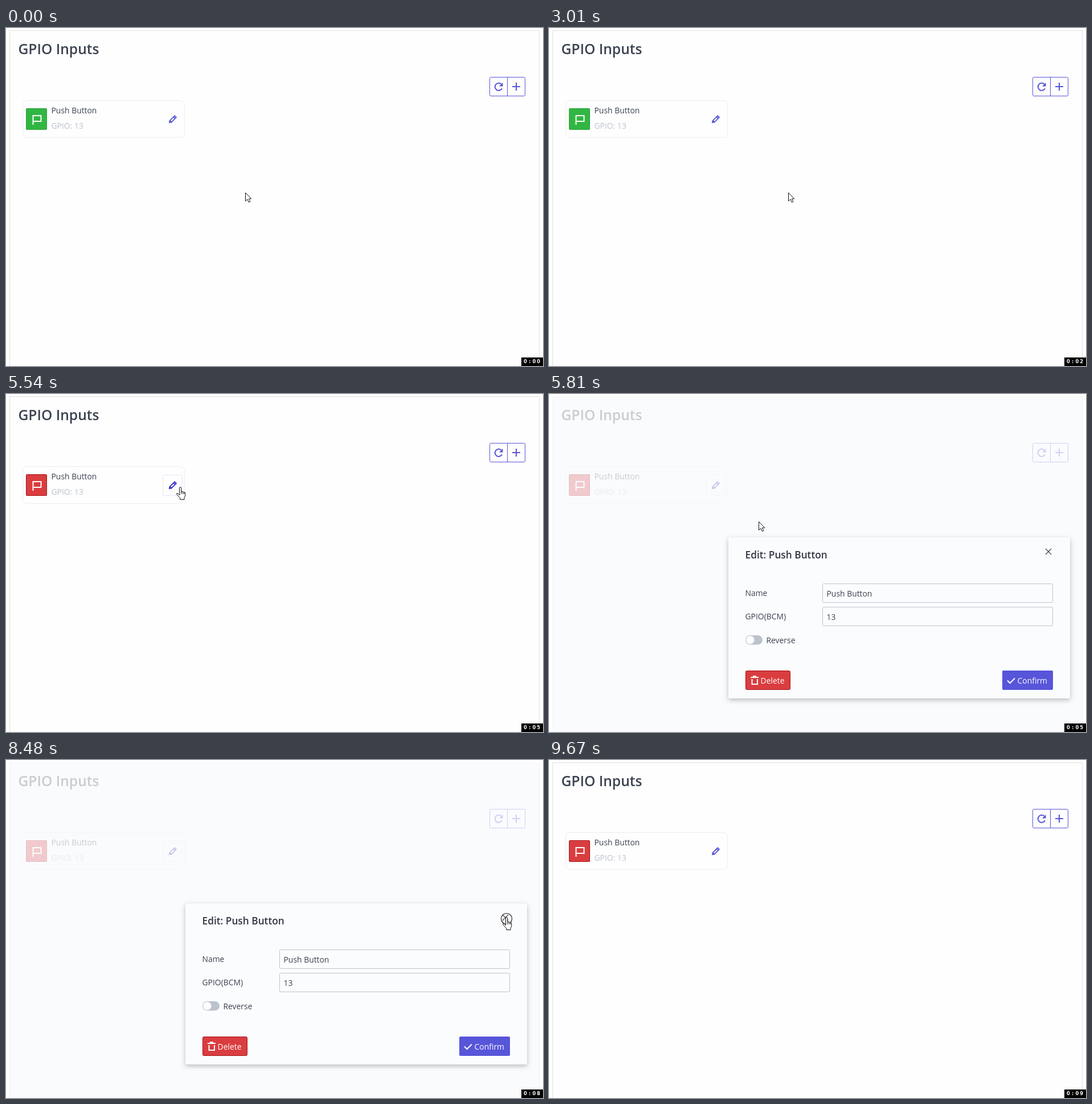
An HTML page for the animation above (9.77 s loop, 943 by 594 pixels).

```html
<!DOCTYPE html>
<html lang="en">
<head>
<meta charset="utf-8">
<title>GPIO Inputs</title>
<style>
  html, body { margin: 0; width: 100%; height: 100%; overflow: hidden; background: #fff; }
  svg { display: block; width: 943px; height: 594px; }
  text { font: 13.9px "Open Sans", "Noto Sans", sans-serif; fill: #3b4351; }
  text.title { font-size: 24.6px; font-weight: 600; }
  text.heading { font-size: 17.3px; font-weight: 600; fill: #303742; }
  text.muted { fill: #bcc3ce; }
  text.light { fill: #fff; }
  text.clock { font: bold 8.4px "DejaVu Sans", sans-serif; fill: #fff; text-anchor: middle; }
  .line { fill: none; stroke: currentColor; stroke-width: 2; }
  .primary { color: #5755d9; }
  .white { color: #fff; }
  .field { fill: #fbfcfe; stroke: #bcc3ce; }
  .danger { fill: #da3d3f; stroke: #a51518; }
  #modal > .box { fill: #fbfcfe; filter: drop-shadow(0 3px 4px rgba(48, 55, 66, .32)); }
  .cursor { fill: #fff; stroke: #111; stroke-width: 1; stroke-linejoin: round; }
</style>
</head>
<body>
<svg viewBox="0 0 943 594">
  <rect x="6.5" y="4.5" width="930" height="600" fill="#fefefe" stroke="#dfe0e2"/>
  <text class="title" x="21.5" y="46">GPIO Inputs</text>

  <!-- toolbar -->
  <g class="primary">
    <path class="line" style="stroke-width:1" d="M851.5 86.5h58a2 2 0 0 1 2 2v29a2 2 0 0 1-2 2h-58a2 2 0 0 1-2-2v-29a2 2 0 0 1 2-2zM880.5 86.5v33"/>
    <path class="line" d="M871 106.2A6.5 6.5 0 1 1 869.6 98.5"/>
    <path fill="currentColor" d="M872.5 96v6.5h-6.5z"/>
    <path class="line" d="M889 103h14M896 96v14"/>
  </g>

  <!-- input card -->
  <rect x="29.5" y="127.5" width="284" height="65" rx="8" fill="none" stroke="#ebecef"/>
  <rect id="badge" x="35.5" y="141.5" width="36" height="37" rx="1.5"/>
  <path class="line white" d="M47.5 170v-16h14v10h-14"/>
  <text x="79.5" y="150">Push Button</text>
  <text class="muted" x="79.5" y="177">GPIO: 13</text>
  <rect id="editHover" x="275.5" y="142.5" width="34" height="36" rx="2" fill="#fefefe" stroke="#e6e6f6"/>
  <g id="pencil">
    <path class="line" style="stroke-width:1.8" d="M287.8 162.6l8.3-8.3 2.8 2.8-8.3 8.3zM294.2 156.2l2.8 2.8"/>
    <path fill="currentColor" d="M285.8 167.2l1-5.2 4.2 4.2z"/>
  </g>

  <!-- edit dialog -->
  <g id="modal">
    <rect x="6" y="4" width="932" height="590" fill="#f8fafd" opacity=".75"/>
    <rect class="box" x="315" y="252" width="600" height="283" rx="2"/>
    <text class="heading" x="344.5" y="288.5">Edit: Push Button</text>
    <path class="line" style="stroke-width:1.2" color="#444" d="M872 272l10 10m0-10l-10 10"/>
    <text x="344.5" y="355">Name</text>
    <rect class="field" x="480.5" y="333.5" width="404" height="33" rx="2"/>
    <text x="487.5" y="356">Push Button</text>
    <text x="344.5" y="396">GPIO(BCM)</text>
    <rect class="field" x="480.5" y="374.5" width="404" height="33" rx="2"/>
    <text x="487.5" y="397">13</text>
    <rect x="345" y="424" width="30" height="16.5" rx="8.2" fill="#bcc3ce"/>
    <circle cx="353.3" cy="432.2" r="7.2" fill="#fff"/>
    <text x="381.5" y="437.5">Reverse</text>
    <rect class="danger" x="345.5" y="486.5" width="78" height="33" rx="2"/>
    <path class="line white" d="M354 498h14M358 496h6M356.5 501v9h9.5v-9"/>
    <text class="light" x="371.5" y="508.5">Delete</text>
    <rect x="796" y="486" width="89" height="34" rx="2" fill="#5755d9"/>
    <path class="line white" d="M805 503.5l4.5 4.5 8.5-8.5"/>
    <text class="light" x="822.5" y="508.5">Confirm</text>
  </g>
  <circle id="press" cx="879" cy="279" r="9.5" fill="none" stroke="#222" stroke-width="1.2"/>

  <path id="arrow" class="cursor" d="M.5.5v14.7l3.4-3.2 2.4 5.3 2.5-1.1-2.4-5.1h4.4z"/>
  <path id="hand" class="cursor" d="M5.5 14.5V2.2a1.6 1.6 0 0 1 3.2 0v6.3q1.5-1.2 2.6.5 1.6-1 2.4.6 1.9-.6 2 1.4v5.2l-1.7 3.3v3H6.8v-2.6L1 13.6q-1.2-2.2 1-2.4zM8.7 8.5v4.3M11.3 9v3.8M13.7 9.8v3"/>

  <rect x="905" y="579" width="38" height="15"/>
  <text id="clock" class="clock" x="912 919.8 927.3 935.1" y="589.1"></text>
</svg>
<script>
const LOOP = 9770;
const GREEN = ["#32b643", "#2da23c"];
const RED = ["#da3d3f", "#a51518"];
const TURNING = ["#a8613f", "#803f23"];

// Every track lists [start time, value] and holds its value until the next entry.
const badgeTrack = [[0, GREEN], [830, RED], [3010, GREEN], [4920, TURNING], [5270, RED]];
const clockTrack = [0, 930, 1930, 3110, 4170, 5020, 6160, 7360, 8480, 9400]
  .map((time, second) => [time, second]);
const cursorTrack = [
  [0, ["arrow", 420, 289]],
  [4920, ["arrow", 364, 246]],
  [5270, ["arrow", 316, 172]],
  [5540, ["hand", 299, 163]],
  [5810, ["arrow", 368, 224]],
  [6060, ["arrow", 470, 275]],
  [6420, ["arrow", 656, 425]],
  [7260, ["arrow", 890, 288]],
  [7630, ["arrow", 880, 265]],
  [7880, ["hand", 872, 276]],
  [8750, ["arrow", 878, 277]],
  [9020, ["arrow", 875, 278]],
  [9300, ["arrow", 899, 528]],
  [9670, ["none", 0, 0]],
];

const el = id => document.getElementById(id);
const valueAt = (track, time) => track.findLast(([start]) => start <= time)[1];
const show = (id, visible) => el(id).setAttribute("visibility", visible ? "visible" : "hidden");

function draw(time) {
  const [fill, stroke] = valueAt(badgeTrack, time);
  el("badge").setAttribute("fill", fill);
  el("badge").setAttribute("stroke", stroke);

  const hovered = time >= 5540 && time < 8750;
  show("editHover", hovered);
  el("pencil").style.color = hovered ? "#3330c4" : "#5755d9";
  show("modal", time >= 5810 && time < 8750);
  show("press", time >= 8380 && time < 8750);

  const [shape, x, y] = valueAt(cursorTrack, time);
  for (const id of ["arrow", "hand"]) {
    show(id, id === shape);
    el(id).setAttribute("transform", `translate(${x} ${y})`);
  }
  el("clock").textContent = `0:0${valueAt(clockTrack, time)}`;
}

function tick() {
  draw(performance.now() % LOOP);
  requestAnimationFrame(tick);
}
tick();
</script>
</body>
</html>
```
